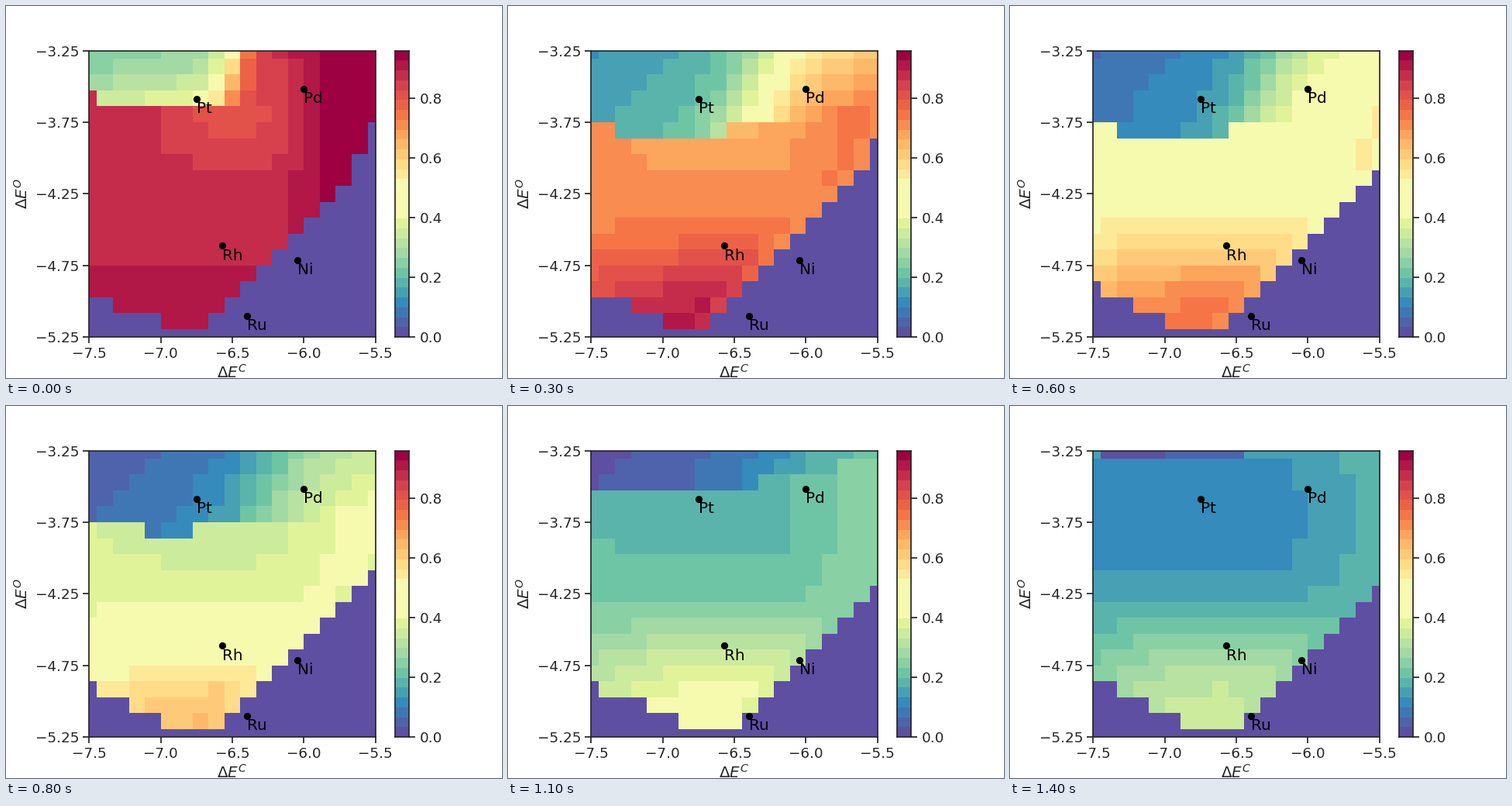
Animation of 640x480 px, one loop 1.5 s. Source, as a matplotlib script:

```python
import matplotlib.pyplot as plt
import numpy as np
from matplotlib.animation import FuncAnimation
from matplotlib.colors import ListedColormap

N = 19                       # grid points along each axis
FRAMES = 15
BANDS = 29
VMAX = 0.958
INK = "#262626"

row, col = np.mgrid[:N, :N].astype(float)   # row 0 at the top

# Key points over time: value of the plateau, value at the lower edge (both
# in percent) and how many rows the cold upper region reaches down
TIMES = [0, 2, 4, 8, 10, 12, 14]
PLATEAU = [88, 80.5, 61, 38, 25, 18, 14]
LOWER = [90, 95, 86, 63, 46, 39.5, 35]
REACH = [3.2, 5.04, 5.25, 5.04, 3.35, 1.4, 0.3]


def nearest(x):
    return np.floor(x + 0.5)


def warm_region(t, settle):
    plateau = np.interp(t, TIMES, PLATEAU)
    lower = np.interp(t, TIMES, LOWER)

    u = np.clip((row - 8) / 9, 0, 1)
    down = (u * u * (3 - 2 * u)) ** (1.7 - t / 14)
    edge = lower - 8 * settle * ((col - 8) / 8) ** 2

    dx = (col - 9 + 0.2 * t) / (4.5 + 0.4 * t)
    dy = (row - 4) / 3.2
    dimple = (7 - 0.3 * t) * np.exp(-dx ** 2 - dy ** 2)
    gain = (10 - 6 * settle) * np.clip((col - 12) / 5, 0, 1)
    return plateau - dimple + gain * (1 - down) + (edge - plateau) * down


def cold_region(t, settle, warm):
    low = (25 * np.exp(-t / 5) - 1 + 0.6 * col + 0.5 * row
           + (1 - settle) * row ** 2)
    high = warm * (1 - 0.2 * settle * np.clip(1 - row / 4, 0, 1))
    center = 9.3 + 1.8 * settle + 0.1 * t - 0.3 * row
    mix = 1 / (1 + np.exp((center - col) / (0.6 + 0.7 * settle)))
    return low + (high - low) * mix


def field(t):
    settle = 1 - np.exp(-t)
    z = warm_region(t, settle)

    reach = np.interp(t, TIMES, REACH) - ((col - 5) / 9) ** 2
    z = np.where(row <= reach, cold_region(t, settle, z), z)

    # Staircase limits of the active area, slightly dimmer along the right one
    lag = nearest(np.clip(2 - t / 6, 0, 2))
    last = np.minimum(26 - lag - row, np.floor(20 + 0.25 * t - 0.5 * row))
    first = nearest(2.3 * (row - 15) + t / 9)
    z = np.where(col == last, z * (1 - 0.05 * settle), z)
    z[(col > last) | (col < first) | (row == N - 1)] = 0
    return np.clip(np.floor(z / 100 / VMAX * BANDS), 0, BANDS - 1)


colors = plt.get_cmap("Spectral_r")(np.linspace(0, 1, BANDS))
colors[12:16, :3] = np.array([246, 250, 175]) / 255   # one wide yellow band
style = dict(cmap=ListedColormap(colors), vmin=-0.5, vmax=BANDS - 0.5)

plt.rcParams.update({
    "font.family": "DejaVu Sans",
    "axes.edgecolor": INK, "axes.labelcolor": INK, "axes.linewidth": 1.25,
    "xtick.color": INK, "ytick.color": INK,
    "xtick.labelsize": 13.2, "ytick.labelsize": 13.2, "axes.labelsize": 14.4,
    "xtick.major.size": 6, "ytick.major.size": 6,
    "xtick.major.width": 1.25, "ytick.major.width": 1.25,
})

fig = plt.figure(figsize=(6.4, 4.8), dpi=100, facecolor="white")
ax = fig.add_axes([107.2 / 640, 0.11, 369.6 / 640, 0.77])
bar = fig.add_axes([501.6 / 640, 0.11, 18.48 / 640, 0.77])

half = 1 / (N - 1)
x_edges = np.linspace(-7.5 - half, -5.5 + half, N + 1)
y_edges = np.linspace(-3.25 + half, -5.25 - half, N + 1)
mesh = ax.pcolormesh(x_edges, y_edges, field(0), **style)
ax.set(xlim=(-7.5, -5.5), ylim=(-5.25, -3.25),
       xticks=np.arange(-7.5, -5.4, 0.5), yticks=np.arange(-5.25, -3.2, 0.5))
ax.set_xlabel(r"$\Delta E^C$", labelpad=2.2)
ax.set_ylabel(r"$\Delta E^O$")
ax.xaxis.set_major_formatter("{x:.1f}")
ax.yaxis.set_major_formatter("{x:.2f}")

metals = {"Pt": (-6.749, -3.588), "Pd": (-6.0, -3.517), "Rh": (-6.568, -4.613),
          "Ni": (-6.043, -4.713), "Ru": (-6.397, -5.103)}
for name, point in metals.items():
    ax.plot(*point, "o", color="black", markersize=5.6)
    ax.annotate(name, point, xytext=(0, -13), textcoords="offset points",
                ha="left", va="baseline", fontsize=14.4, color="black")

bar.pcolormesh([0, 1], np.linspace(0, VMAX, BANDS + 1),
               np.arange(BANDS)[:, None], **style)
bar.set(xticks=[], yticks=np.arange(0, 0.9, 0.2), ylim=(0, VMAX))
bar.yaxis.tick_right()
bar.yaxis.set_major_formatter("{x:.1f}")


def draw(frame):
    mesh.set_array(field(frame))
    return [mesh]


anim = FuncAnimation(fig, draw, frames=FRAMES, interval=100, repeat=True)
plt.show()
```
